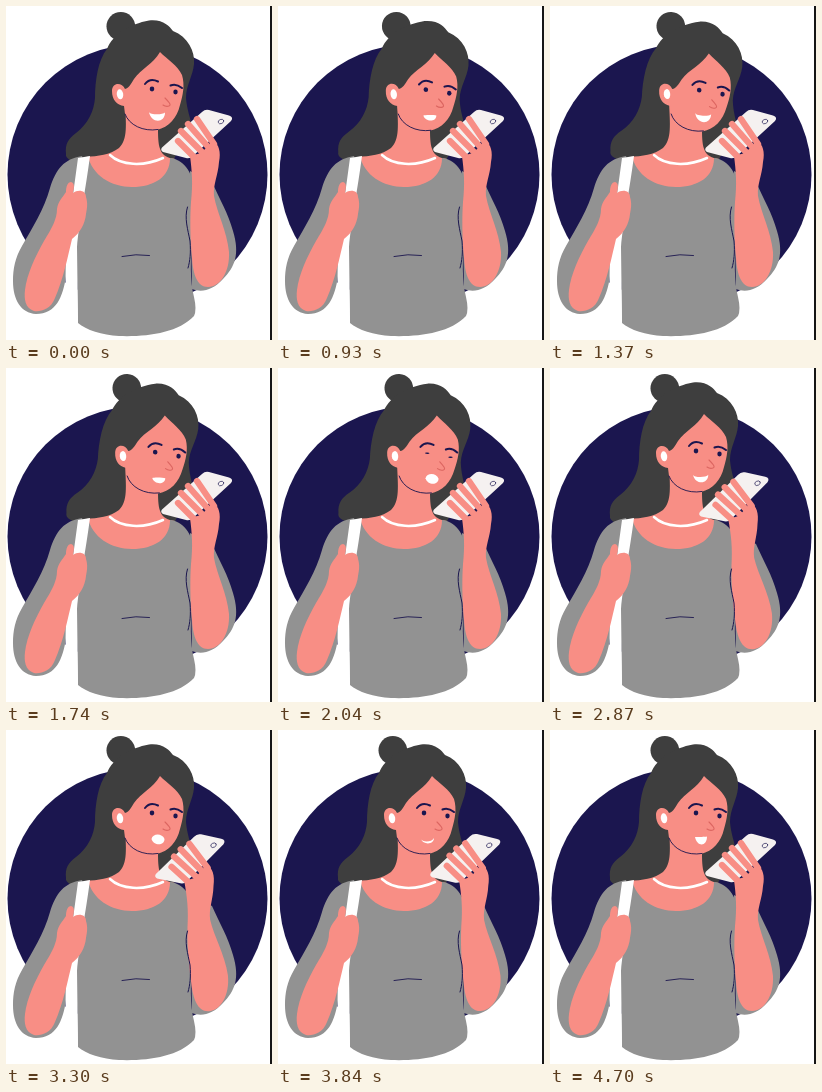
Write an HTML page with a canvas that moves like this. It is 266 px wide and 334 px high and loops after 4.73 s.

```html
<!DOCTYPE html>
<html lang="en">
<head>
<meta charset="utf-8">
<title>Woman talking on a phone</title>
<style>
html, body { margin: 0; width: 100%; height: 100%; overflow: hidden; background: #fff; }
canvas { display: block; width: 266px; height: 334px; }
</style>
</head>
<body>
<canvas id="stage" width="266" height="334"></canvas>
<script>
const ctx = document.getElementById('stage').getContext('2d');
const LOOP = 4730;
const NAVY = '#1b164f', HAIR = '#3e3e3e', SKIN = '#f88e85', SHIRT = '#929292';

function fill(path, color) {
  ctx.fillStyle = color;
  ctx.fill(new Path2D(path));
}

function line(path, color, width) {
  ctx.strokeStyle = color;
  ctx.lineWidth = width;
  ctx.lineCap = ctx.lineJoin = 'round';
  ctx.stroke(new Path2D(path));
}

function oval(x, y, rx, ry, color, angle = 0) {
  ctx.fillStyle = color;
  ctx.beginPath();
  ctx.ellipse(x, y, rx, ry, angle, 0, Math.PI * 2);
  ctx.fill();
}

function turned(x, y, degrees, draw) {
  ctx.save();
  ctx.translate(x, y);
  ctx.rotate(degrees * Math.PI / 180);
  ctx.translate(-x, -y);
  draw();
  ctx.restore();
}

function ease(t, start, end) {
  const p = Math.min(1, Math.max(0, (t - start) / (end - start)));
  return p * p * (3 - 2 * p);
}

// Mouth: left corner, right corner, upper and lower control heights
const SMILE = [143, 106, 159, 106.5, 109, 117.5];
const SMALL = [145, 107, 157, 106.5, 107, 117];
const ROUND = [145.5, 109, 158.5, 109, 103, 116];
const SHUT = [143, 109, 156, 108, 112.5, 115];
const SPEECH = [
  [0, SMILE], [570, SMILE], [800, ROUND], [1050, SHUT], [1370, SMILE],
  [1650, ROUND], [1830, SHUT], [2010, ROUND], [2120, ROUND], [2450, SHUT],
  [2560, SHUT], [2800, SMILE], [3020, SHUT], [3250, ROUND], [3370, ROUND],
  [3600, SMILE], [3840, SHUT], [4080, ROUND], [4380, SHUT], [4700, SMALL], [LOOP, SMILE]
];

function mouthAt(t) {
  const i = SPEECH.findIndex(([time]) => time > t);
  const [t0, a] = SPEECH[i - 1], [t1, b] = SPEECH[i];
  const k = ease(t, t0, t1);
  return a.map((v, n) => v + (b[n] - v) * k);
}

function drawHairBack() {
  oval(114.8, 20.3, 14.3, 14.3, HAIR);
  fill('M101 43C107 28 124 18 143 14.5C157 13 163 20 167 25C182 31 189 45 188 58C187 70 180 79 180 92' +
    'C181 104 184 110 185 117L168 153L75 157C65 156 59 152 60 148C59 138 62 133 70 127' +
    'C82 118 88 105 89 92C89 75 92 54 101 43Z', HAIR);
}

function drawFace(t) {
  fill('M154 46C147 58 135 63 128 73C125 78 123 82 119 83C116 76 106 76 106 85C106 94 111 99 118 100' +
    'L119 108C123 119 137 126 151 124C163 121 171 112 174 99C177 89 179 79 176 69C172 60 161 53 154 46Z', SKIN);
  line('M119 108C123 119 137 126 152 123.5', NAVY, 0.9);
  oval(114, 88.3, 3.2, 5, '#fff', -0.15);

  line('M139 78Q144 71.5 152 75.5', NAVY, 2);
  line('M164.5 79.5Q170 77 176 82', NAVY, 2);
  const blink = ease(t, 1940, 2010) - ease(t, 2080, 2150);
  const height = 2.4 * (1 - 0.7 * blink);
  oval(146, 83 + blink, 2.3, height, NAVY);
  oval(169.5, 86 + blink, 2.2, height, NAVY);
  line('M159 92C162 95 166 99 163 100Q160 101 157 99', '#db6560', 1.1);

  const [lx, ly, rx, ry, up, low] = mouthAt(t);
  fill(`M${lx} ${ly}C${lx + 1} ${up} ${rx - 2} ${up} ${rx} ${ry}C${rx} ${low} ${lx + 2} ${low} ${lx} ${ly}Z`, '#fff');
}

function drawBody() {
  fill('M76 150C58 153 50 163 44 182C38 204 26 222 16 240C9 252 7 263 7 275C7 294 15 307 30 308' +
    'C50 308 57 291 60 270L64 240L84 180Z', SHIRT);
  fill('M184 165L206 176C214 194 222 207 227 225C234 248 229 261 217 273C207 284 196 287 186 283Z', SHIRT);
  fill('M119 95C120 119 122 133 113 142C104 149 92 150 80 151L92 190H158L169 153C154 151 152 143 152 123Z', SKIN);
  fill('M82 150C86 169 105 181 126 181C148 181 164 171 164 152C176 153 187 164 189 187L187 230' +
    'C184 253 184 275 188 291Q191 304 188 310C172 327 141 331 113 330C96 329 80 324 72 317L70 230Z', SHIRT);
  line('M104 149C115 159.5 137 161 157 152', '#fff', 2.5);
  line('M116 250.5Q130 247.5 143.5 249.5', NAVY, 0.9);
}

function drawBagArm() {
  fill('M72 152L84 150C80 181 73 217 71 241L72 319L59 310L60 240Z', '#fff');
  fill('M60 186C60 180 62 176 65 176C69 177 68 182 67 187C72 183 80 184 80 191C82 197 81 203 80 208' +
    'C79 218 74 227 66 233C62 250 57 274 49 292C45 303 35 306 28 305C19 302 18 293 19 284' +
    'C21 268 29 251 38 235C46 222 51 213 51 203C52 195 57 191 60 186Z', SKIN);
}

function drawPhoneArm() {
  fill('M156 141.5L196 106Q199 103 203 104L223 109.5Q228 111 225 115L187 150Q184 153 180 152L157 146Q154 144 156 141.5Z', '#f5f1f0');
  ctx.strokeStyle = NAVY;
  ctx.lineWidth = 0.7;
  ctx.beginPath();
  ctx.ellipse(215, 115.5, 2.9, 2.1, -0.4, 0, Math.PI * 2);
  ctx.stroke();
  line('M172 135L188 151M175 125L197 147M182 118L204 143M191 113L208 138', SKIN, 6.3);
  fill('M184 150L195 147L207 135C213 138 215 146 213 156C212 170 207 178 208 190C211 207 221 225 223 246' +
    'C224 266 214 281 202 281C191 281 187 268 186 252C184 230 184 210 185 196C187 178 186 165 184 150Z', SKIN);
}

function draw(t) {
  const tilt = 2.5 * (ease(t, 600, 1200) - ease(t, 2080, 2480));
  const reach = -2.8 * (ease(t, 2150, 2500) - ease(t, 3620, 4060));
  ctx.fillStyle = '#fff';
  ctx.fillRect(0, 0, 266, 334);
  oval(131.5, 168.5, 130, 130, NAVY);
  turned(120, 157, tilt, drawHairBack);
  drawBody();
  turned(120, 157, tilt, () => drawFace(t));
  drawBagArm();
  turned(205, 268, reach, drawPhoneArm);
  line('M181.5 201C178 212 182 224 184 235C185 247 184 255 182 262', NAVY, 1);
  ctx.fillStyle = '#151515';
  ctx.fillRect(264, 0, 2, 334);
}

const start = performance.now();
function tick() {
  draw((performance.now() - start) % LOOP);
  requestAnimationFrame(tick);
}
tick();
</script>
</body>
</html>
```
